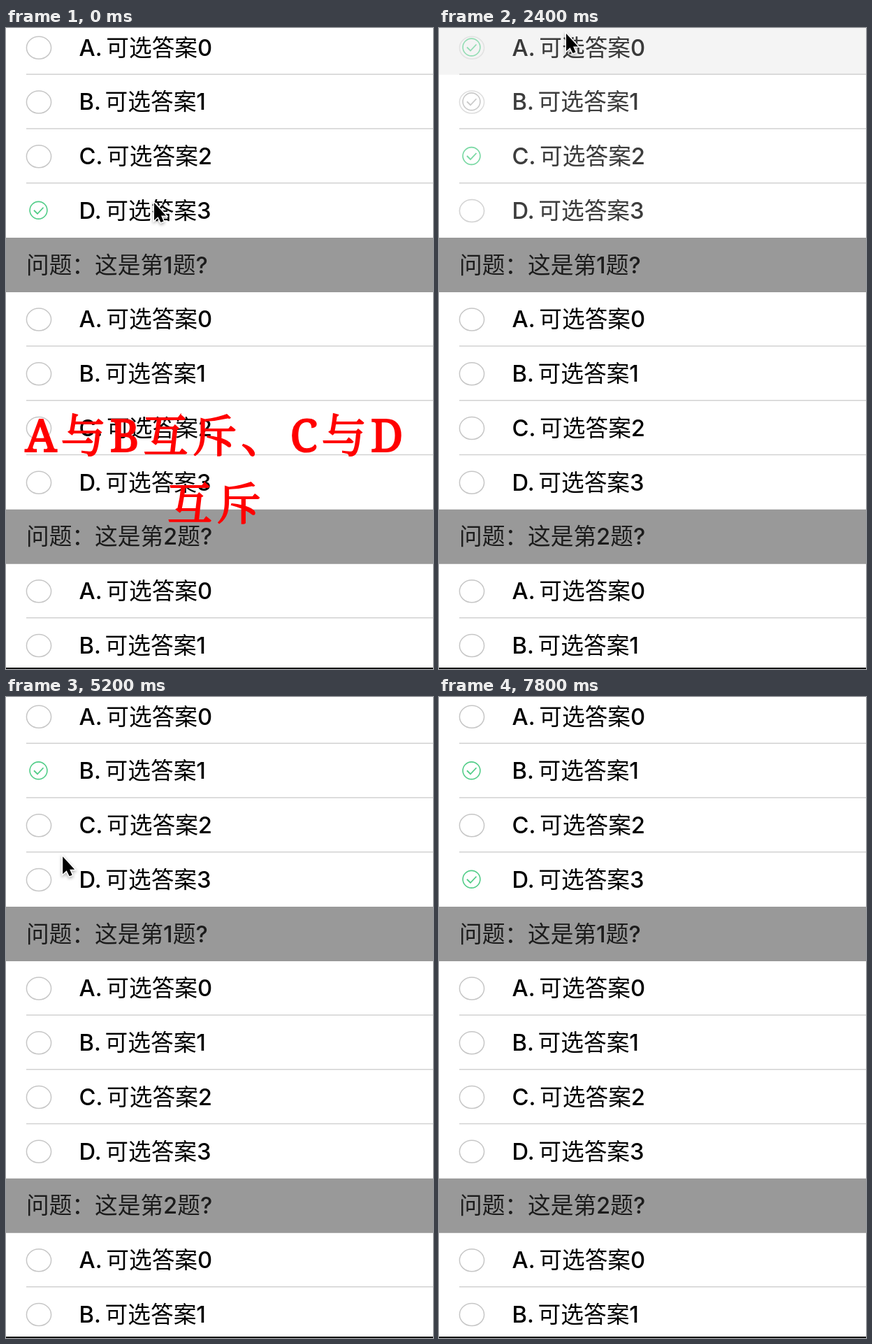
An HTML page with a canvas for the animation above (8000 ms loop, 611 px wide and 917 px high).

```html
<!DOCTYPE html>
<html lang="zh-CN">
<head>
<meta charset="utf-8">
<style>
html, body { margin: 0; width: 100%; height: 100%; overflow: hidden; background: #fff; }
canvas { display: block; }
</style>
</head>
<body>
<canvas id="stage" width="611" height="917"></canvas>
<script>
const ctx = document.getElementById('stage').getContext('2d');
const LOOP = 8000, STEP = 200, FADE = 300, DWELL = 180, PITCH = 77.75;
const CAPTION_END = 600, CURSOR_END = 7800;
const SANS = '500 32.7px Inter, "Noto Sans CJK SC", "Noto Sans CJK", sans-serif';
const BRUSH = '500 64px "Noto Serif", "Noto Serif CJK SC", "Noto Sans CJK SC", serif';
const GREEN = '#52cd88';

// Each tap: time and cursor tip; the row follows from y
const start = { at: -DWELL, x: 212, y: 250 };
const taps = [
  { at: 420, x: 200, y: 171 },
  { at: 1220, x: 188, y: 94 },
  { at: 2220, x: 182, y: 8 },
  { at: 3220, x: 172, y: 103 },
  { at: 4420, x: 150, y: 187 },
  { at: 5620, x: 33, y: 257 },
  { at: 6160, x: 166, y: 103 },
  { at: 7220, x: 166, y: 103 }
];

const rowY = i => 28 + PITCH * i;
const clamp = v => Math.min(1, Math.max(0, v));

// A and B exclude each other, and so do C and D
function toggle(checked, row) {
  const next = checked.filter(r => r !== row && r !== (row ^ 1));
  return checked.includes(row) ? next : [...next, row];
}

function text(str, y, x, color = '#000') {
  ctx.font = SANS;
  ctx.wordSpacing = '-3px';
  ctx.fillStyle = color;
  ctx.fillText(str, x, y + 11.5);
}

function line(color, width, build) {
  ctx.strokeStyle = color;
  ctx.lineWidth = width;
  ctx.beginPath();
  build();
  ctx.stroke();
}

function ring(y) {
  line('#c6c6c6', 1.5, () => ctx.ellipse(47, y + .3, 17.6, 16, 0, 0, 7));
}

function check(y, color) {
  line(color, 1.6, () => ctx.arc(46.5, y - .5, 12.4, 0, 7));
  line(color, 1.8, () => {
    ctx.moveTo(40, y - .5);
    ctx.lineTo(45, y + 4.5);
    ctx.lineTo(53.5, y - 4.5);
  });
}

// Checks that are not kept turn grey while they fade out
function options(first, count, checked = [], kept = checked) {
  for (let k = 0; k < count; k++) {
    const y = rowY(first + k);
    if (checked.includes(k)) check(y, kept.includes(k) ? GREEN : '#777');
    else ring(y);
    text(`${'ABCD'[k]}. 可选答案${k}`, y, 104.5);
  }
}

function separators(first, count) {
  ctx.fillStyle = '#d2d2d2';
  for (let k = 0; k < count; k++) ctx.fillRect(29, rowY(first + k) + 37.5, 582, 1.5);
}

function header(i, n) {
  ctx.fillStyle = '#999';
  ctx.fillRect(0, rowY(i) - 39, 611, 78);
  text(`问题：这是第${n}题?`, rowY(i), 29, '#1c1c1c');
}

function highlight(row, alpha) {
  ctx.globalAlpha = alpha;
  ctx.fillStyle = '#d1d1d1';
  ctx.fillRect(0, rowY(row) - 39, 611, PITCH);
  ctx.globalAlpha = 1;
}

function firstSection(t) {
  let before = [3], now = [3], fade = 1;
  for (const { at, y } of taps) {
    const row = Math.floor(y / PITCH), p = clamp((t - at) / FADE);
    if (t > at - STEP) highlight(row, clamp(1 - p / .8));
    if (t < at) break;
    before = now;
    now = toggle(now, row);
    fade = p;
  }
  if (fade < 1) {
    ctx.globalAlpha = 1 - fade;
    options(0, 4, before, now);
  }
  ctx.globalAlpha = fade;
  options(0, 4, now);
  ctx.globalAlpha = 1;
  separators(0, 3);
}

function caption() {
  ctx.save();
  ctx.font = BRUSH;
  ctx.letterSpacing = '6px';
  ctx.textAlign = 'center';
  ctx.fillStyle = ctx.strokeStyle = '#f00';
  ctx.lineWidth = 2;
  ['A与B互斥、C与D', '互斥'].forEach((str, i) => {
    ctx.fillText(str, 301, 606 + 97 * i);
    ctx.strokeText(str, 301, 606 + 97 * i);
  });
  ctx.restore();
}

function cursor(t) {
  const stops = [start, ...taps];
  const i = stops.findLastIndex(s => s.at <= t);
  const a = stops[i], b = stops[i + 1] || a;
  const u = b === a ? 0 : clamp((t - a.at - DWELL) / (b.at - a.at - DWELL));
  const arrow = new Path2D('M0 0V25L5.5 20L9.5 28L13.5 26.5L10 18.5H17Z');
  ctx.save();
  ctx.translate(a.x + (b.x - a.x) * u, a.y + (b.y - a.y) * u);
  ctx.shadowColor = 'rgba(0,0,0,.35)';
  ctx.shadowBlur = 4;
  ctx.shadowOffsetY = 2;
  ctx.strokeStyle = '#fff';
  ctx.lineWidth = 3;
  ctx.stroke(arrow);
  ctx.shadowColor = 'transparent';
  ctx.fillStyle = '#000';
  ctx.fill(arrow);
  ctx.restore();
}

function draw(now) {
  const t = Math.floor(now % LOOP / STEP) * STEP;
  ctx.fillStyle = '#fff';
  ctx.fillRect(0, 0, 611, 917);
  firstSection(t);
  header(4, 1);
  options(5, 4);
  separators(5, 3);
  header(9, 2);
  options(10, 2);
  separators(10, 1);
  ctx.fillStyle = '#111';
  ctx.fillRect(0, 915, 611, 2);
  if (t < CAPTION_END) caption();
  if (t < CURSOR_END) cursor(t);
  requestAnimationFrame(draw);
}

draw(performance.now());
</script>
</body>
</html>
```
